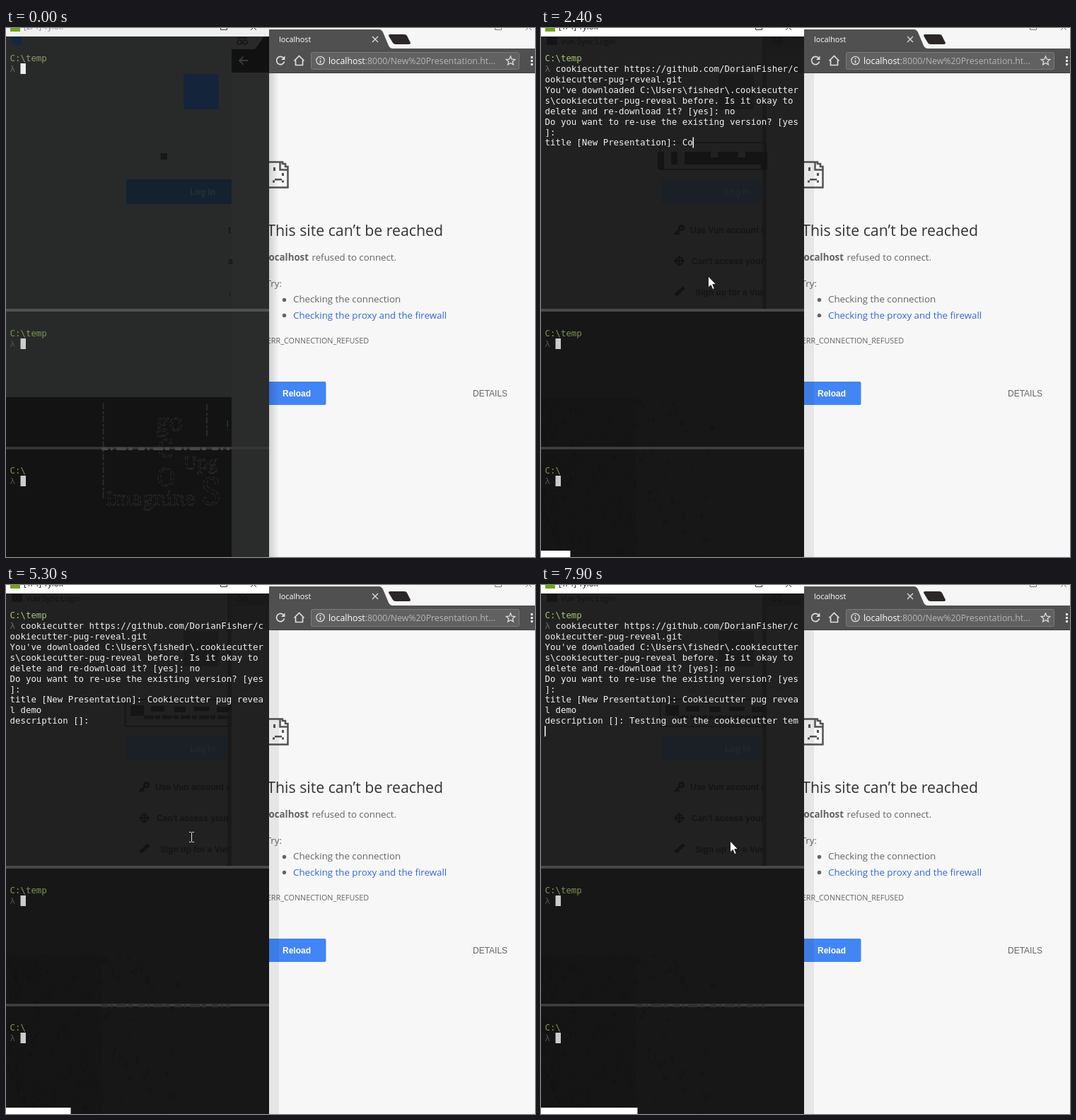
Recreate the animation shown at these times as an HTML page. Size 748 by 748 pixels, loop 8 s.

```html
<!DOCTYPE html>
<html lang="en">
<head>
<meta charset="utf-8">
<title>Terminal and browser</title>
<style>
html, body { margin: 0; width: 100%; height: 100%; overflow: hidden; background: #f7f7f7; }
svg { display: block; width: 748px; height: 748px; }
text { white-space: pre; }
.ui { font-family: "Open Sans", "Noto Sans", sans-serif; font-size: 13.3px; fill: #646464; }
.arial { font-family: "Liberation Sans", Arial, sans-serif; font-size: 12px; }
.mono { font-family: "DejaVu Sans Mono", monospace; font-size: 12.425px; }
.line { fill: none; stroke: #ddd; stroke-width: 1.7; }
.ghost { font: bold 12px "Liberation Sans", Arial, sans-serif; fill: #151515; }
.serif { font-family: "Noto Serif", serif; fill: none; stroke: #2b2b2b; stroke-dasharray: 7 3 4 2; }
.hide { display: none; }
</style>
</head>
<body>
<svg viewBox="0 0 748 748">
  <defs>
    <linearGradient id="shade">
      <stop offset="0" stop-color="#000" stop-opacity=".16"/>
      <stop offset="1" stop-color="#000" stop-opacity="0"/>
    </linearGradient>
  </defs>

  <!-- browser -->
  <rect x="372" width="376" height="30" fill="#f6f6f6"/>
  <path d="M372 2H527Q531 2 533 6L541 25Q543 29 547 29H748V64H372Z" fill="#505050"/>
  <path d="M372 63.500H748" stroke="#3f3f3f"/>
  <path d="M543 9H563Q566 9 567 11L572 21Q572 23 570 23H551Q548 23 547 21L541 11Q541 9 543 9Z" fill="#2b2727"/>
  <path d="M691.5 0V2.500H700.500V0M735 3L739 -1L743 3" fill="none" stroke="#777"/>
  <path d="M518 12L526 20M526 12L518 20" class="line" style="stroke-width:1.3"/>
  <text class="ui" x="386" y="20" style="font-size:10.8px;fill:#fff">localhost</text>
  <path d="M392.600 42.500A5.600 5.600 0 1 0 393.600 47.500" class="line"/>
  <path d="M394.500 39.500V45H389Z" fill="#ddd"/>
  <path d="M407.500 46.500L414.500 39.500L421.500 46.500M409.500 45.500V52.500H419.500V45.500" class="line"/>
  <rect x="431.500" y="34.500" width="294" height="24" rx="2" fill="#616161" stroke="#7c7c7c"/>
  <circle cx="444.500" cy="46" r="5.700" class="line" style="stroke-width:1.3"/>
  <path d="M444.500 42.500V44M444.500 45.500V49.500" class="line"/>
  <text class="ui" x="456" y="50.500" style="font-size:12.35px;fill:#b6b6b6"><tspan fill="#fff">localhost</tspan>:8000/New%20Presentation.ht...</text>
  <path d="M713.500 40L715.300 44.200L719.700 44.500L716.300 47.400L717.400 51.800L713.500 49.400L709.600 51.800L710.700 47.400L707.300 44.500L711.700 44.200Z" class="line" style="stroke-width:1.3"/>
  <g fill="#eee"><rect x="742" y="40" width="3" height="3"/><rect x="742" y="45" width="3" height="3"/><rect x="742" y="50" width="3" height="3"/></g>

  <!-- page -->
  <rect x="372" y="64" width="376" height="684" fill="#f7f7f7"/>
  <path d="M369.500 189.500H391V192H395V196H398.500V225.500H369.500ZM387.500 190V200.500H398" fill="none" stroke="#535353" stroke-width="2.500"/>
  <path d="M378 197h3v5h-3zM390 205h3v4h-3zM380 213h10v2.500h-10zM377 215.500h3v3h-3zM390 215.500h3v3h-3z" fill="#535353"/>
  <text class="ui" x="618" y="294" text-anchor="end" style="font-size:21.3px;fill:#333">This site can’t be reached</text>
  <text class="ui" x="428" y="329" text-anchor="end" font-weight="700">localhost</text>
  <text class="ui" x="432.500" y="329">refused to connect.</text>
  <text class="ui" x="390" y="366" text-anchor="end">Try:</text>
  <circle cx="393.500" cy="384.500" r="2.700" fill="#646464"/>
  <circle cx="393.500" cy="406.500" r="2.700" fill="#646464"/>
  <text class="ui" x="406" y="388">Checking the connection</text>
  <text class="ui" x="406" y="410.500" style="fill:#3367d6">Checking the proxy and the firewall</text>
  <text class="ui" x="513" y="446" text-anchor="end" style="font-size:10.77px">ERR_CONNECTION_REFUSED</text>
  <rect x="360" y="500" width="92.500" height="33" rx="2" fill="#4285f4"/>
  <text class="arial" x="391" y="521" font-weight="700" fill="#fff">Reload</text>
  <text class="arial" x="660" y="521" fill="#666">DETAILS</text>
  <rect id="shadow" x="372" y="64" width="14" height="684"/>

  <!-- terminal, unfocused -->
  <g id="idle">
    <rect width="372" height="748" fill="#2a2b2b"/>
    <rect y="12" width="319" height="510" fill="#282a2a"/>
    <rect y="522" width="319" height="226" fill="#131313"/>
    <path d="M319 12H372V30H319Z" fill="#292929"/>
    <path d="M319 30H372V63H319ZM352 30L365 12H372V30Z" fill="#111"/>
    <path d="M342 46H330M335.500 40.500L330 46L335.500 51.500" fill="none" stroke="#3b3b3b" stroke-width="1.800"/>
    <rect x="8" y="12" width="15" height="12" fill="#152740"/>
    <rect x="251" y="65" width="50" height="50" fill="#14243a"/>
    <path d="M319 214H173Q170 214 170 217V246Q170 249 173 249H319Z" fill="#14212f"/>
    <text class="ghost" x="260" y="236" style="fill:#28303a">Log In</text>
    <rect x="218.500" y="177" width="9.500" height="9" fill="#171717"/>
    <text class="ghost" x="314" y="290">t</text><text class="ghost" x="314" y="334">a</text><text class="ghost" x="315" y="378">.</text>
    <path d="M137.500 530V666M284 532V578M313 555V568" stroke="#2b2b2b" stroke-width="2" stroke-dasharray="9 3 4 2"/>
    <g class="serif">
      <text x="212" y="570" font-size="34">go</text>
      <text x="214" y="607" font-size="36">C</text>
      <text x="251" y="624" font-size="26">Upg</text>
      <text x="213" y="648" font-size="36">O</text>
      <text x="141" y="675" font-size="28">Imagnine</text>
      <text x="276" y="674" font-size="52">S</text>
    </g>
  </g>

  <!-- terminal, focused -->
  <g id="active">
    <rect width="372" height="748" fill="#171717"/>
    <rect y="12" width="372" height="386" fill="#212121"/>
    <path d="M313 12H372V30H319V398H313Z" fill="#1a1a1a"/>
    <path d="M319 30H372V63H319Z" fill="#1c1c1c"/>
    <rect x="8" y="13" width="15" height="11" fill="#151515"/>
    <text class="ui" x="28" y="23" style="font-size:11px;fill:#111">Vun Sync Login</text>
    <rect id="logo" x="251" y="65" width="50" height="50" fill="#161616"/>
    <rect x="168.500" y="162" width="149" height="38" rx="3" fill="none" stroke="#171717" stroke-width="2"/>
    <path id="field" d="M165 175H174V200H165ZM184 175H193V193H184ZM203 175H240V183H250V175H279V183H289V175H320V193H203ZM311 193H320V200H311Z" fill="#141414"/>
    <g id="late" fill="#151515">
      <path d="M176 170H195V185H176ZM205 171H224V179H205ZM238 172H254V180H238ZM266 172H288V178H266ZM298 172H316V180H298Z"/>
      <path d="M195 187H316" stroke="#161616" stroke-width="5" stroke-dasharray="14 2 7 3"/>
    </g>
    <rect x="170" y="214" width="142" height="35" rx="3" fill="#1a2026"/>
    <text class="ghost" x="260" y="236" style="fill:#21282e">Log In</text>
    <text class="ghost" x="211" y="290">Use Vun account c</text>
    <text class="ghost" x="213" y="334">Can't access your</text>
    <text class="ghost" x="218" y="378">Sign up for a Vun</text>
    <g fill="none" stroke="#131313" stroke-width="3">
      <circle cx="198.500" cy="282.500" r="3"/><path d="M196 285L189 292M192 289L195 292"/>
      <circle cx="195.500" cy="329.500" r="5" stroke-width="2"/><path d="M188 329.500H203M195.500 322V337" stroke-width="2"/>
      <path d="M190 378L202 367" stroke-width="5"/>
    </g>
    <g id="grain" fill="#121212"></g>
  </g>

  <g fill="none" stroke="#151515" stroke-width="1.600">
    <circle cx="330" cy="20" r="3"/><circle cx="338" cy="20" r="3"/><path d="M327 14H341"/>
  </g>
  <rect id="titlebar" width="372" height="12"/>
  <rect x="6" width="14" height="5" fill="#73a217"/>
  <g id="caption">
    <text class="ui" id="count" x="25" y="2" style="font-size:11.5px;fill:inherit"></text>
    <path d="M303.500 0V2.500H312.500V0M346 3L350 -1L354 3" fill="none" stroke="#333"/>
  </g>
  <path d="M0 399H372" id="split1" stroke-width="4"/>
  <path d="M0 594H372" id="split2" stroke-width="3.500"/>
  <path id="words" d="M135 595H316" stroke-width="4" stroke-dasharray="9 4 3 5 14 3 6 8"/>

  <g class="mono">
    <text id="home" x="5.500" y="47">C:\temp</text>
    <text x="5.500" y="62" fill="#666">λ</text>
    <g id="log" fill="#f1f1f1"></g>
    <g fill="#7d9451"><text x="5.500" y="436">C:\temp</text><text x="5.500" y="630">C:\</text></g>
    <g fill="#4c4c4c"><text x="5.500" y="451">λ</text><text x="5.500" y="645">λ</text></g>
  </g>
  <path d="M20.500 439H28V454H20.500ZM20.500 633H28V648H20.500Z" fill="#ccc"/>
  <rect id="caret" height="15" fill="#eee"/>

  <path id="arrow" d="M0 0V16L3.700 12.500L6.300 18.500L8.700 17.500L6.200 11.500H11Z" fill="#fff" stroke="#111" stroke-width=".8"/>
  <path id="beam" d="M259 349.500H261.500L262.500 350.500L263.500 349.500H266M262.500 350V363M259 363.500H261.500L262.500 362.500L263.500 363.500H266" fill="none" stroke="#ddd"/>
  <circle id="busy" cx="280" cy="362.500" r="5.700" fill="none" stroke="#1c97ea" stroke-width="3.500"/>
  <rect id="bar" y="739" height="9" fill="#fff"/>
</svg>

<script>
const LOOP = 8000, COLS = 48, CHAR = 7.48, ROW = 14.92, LEFT = 5.5;
const $ = id => document.getElementById(id);
const set = (id, attrs) => { for (const k in attrs) $(id).setAttribute(k, attrs[k]); };
const show = (id, on) => $(id).classList.toggle("hide", !on);
const add = (parent, tag, attrs) => {
  const el = document.createElementNS("http://www.w3.org/2000/svg", tag);
  for (const k in attrs) el.setAttribute(k, attrs[k]);
  return $(parent).appendChild(el);
};

const rows = Array.from({ length: 11 }, (_, i) =>
  add("log", "text", { x: LEFT, y: 62 + i * ROW }));

// faint scratches on the wallpaper
let seed = 7;
const rand = () => (seed = seed * 16807 % 2147483647) / 2147483647;
for (let i = 0; i < 260; i++) {
  const x = rand() * rand() * 290, y = 523 + rand() * 222;
  add("grain", "rect", { x, y, width: 1 + rand() * 5, height: 1 + rand() * 9, opacity: 0.2 + rand() * 0.3 });
}
add("grain", "rect", { x: 0, y: 523, width: 134, height: 225, opacity: 0.25 });

// Text typed so far, from [time, letters] points.
function typed(text, t, pts) {
  let n = 0;
  pts.forEach(([time, count], i) => {
    if (t < time) return;
    const next = pts[i + 1];
    const part = next ? Math.min(1, (t - time) / (next[0] - time)) : 0;
    n = count + (next ? (next[1] - count) * part : 0);
  });
  return text.slice(0, Math.floor(n + 1e-6));
}

const script = [
  [300, "  ", "cookiecutter https://github.com/DorianFisher/cookiecutter-pug-reveal.git", [[300, 0], [500, 73]]],
  [800, "\nYou've downloaded C:\\Users\\fishedr\\.cookiecutters\\cookiecutter-pug-reveal before. Is it okay to delete and re-download it? [yes]: ", "no", [[1300, 0], [1500, 2]]],
  [1700, "\nDo you want to re-use the existing version? [yes]: ", "", []],
  [2100, "\ntitle [New Presentation]: ", "Cookiecutter pug reveal demo", [[2200, 0], [2700, 6], [3300, 9], [3600, 15], [4500, 22], [4800, 28]]],
  [5100, "\ndescription []: ", "Testing out the cookiecutter tem", [[6300, 0], [7000, 13], [7900, 32]]]
];

function wrap(text) {
  const out = [];
  for (const line of text.split("\n"))
    for (let i = 0; i === 0 || i < line.length; i += COLS) out.push(line.slice(i, i + COLS));
  if (out[out.length - 1].length === COLS) out.push("");
  return out;
}

function draw(now) {
  const t = Math.floor(now % LOOP / 100) * 100;
  const idle = t < 100;
  show("idle", idle);
  show("active", !idle);
  show("late", t >= 4100);
  show("field", t < 4100);
  show("words", idle || t >= 4100);
  set("logo", { opacity: t < 800 ? 1 : 0.55 });
  set("words", { stroke: idle ? "#484848" : "#303030" });
  set("titlebar", { fill: idle ? "#f0f0f0" : "#fff" });
  set("caption", { fill: idle ? "#888" : "#111" });
  $("count").textContent = `[${idle ? 2 : 1}/4] Tylok`;
  set("split1", { stroke: idle ? "#505050" : "#484848" });
  set("split2", { stroke: idle ? "#373737" : "#404040" });
  set("home", { fill: idle ? "#929c63" : "#a6c47a" });
  set("shadow", { fill: idle ? "url(#shade)" : "#00000012" });

  let text = "  ";
  for (const [start, prompt, input, pts] of script)
    if (t >= start) text = (text === "  " ? "" : text) + prompt + typed(input, t, pts);
  const lines = wrap(text);
  rows.forEach((row, i) => { row.textContent = lines[i] || ""; });

  const last = lines.length - 1;
  set("caret", {
    x: LEFT + lines[last].length * CHAR - (idle ? 0 : 0.5),
    y: 50 + last * ROW,
    width: idle ? 7.5 : 1.6
  });
  const blinkOff = t >= 5100 && t < 6300 && (t - 4700) % 1060 >= 530;
  show("caret", !blinkOff);

  const beam = t >= 4900 && t < 5700;
  show("arrow", !idle && !beam);
  show("beam", beam);
  set("arrow", { transform: t < 4900 ? "translate(236.500 351)" : "translate(267.500 362)" });
  show("busy", t >= 6500 && t < 7300);
  set("bar", { width: idle ? 0 : t * 0.01727 });
}

function frame() {
  draw(performance.now());
  requestAnimationFrame(frame);
}
frame();
</script>
</body>
</html>
```
